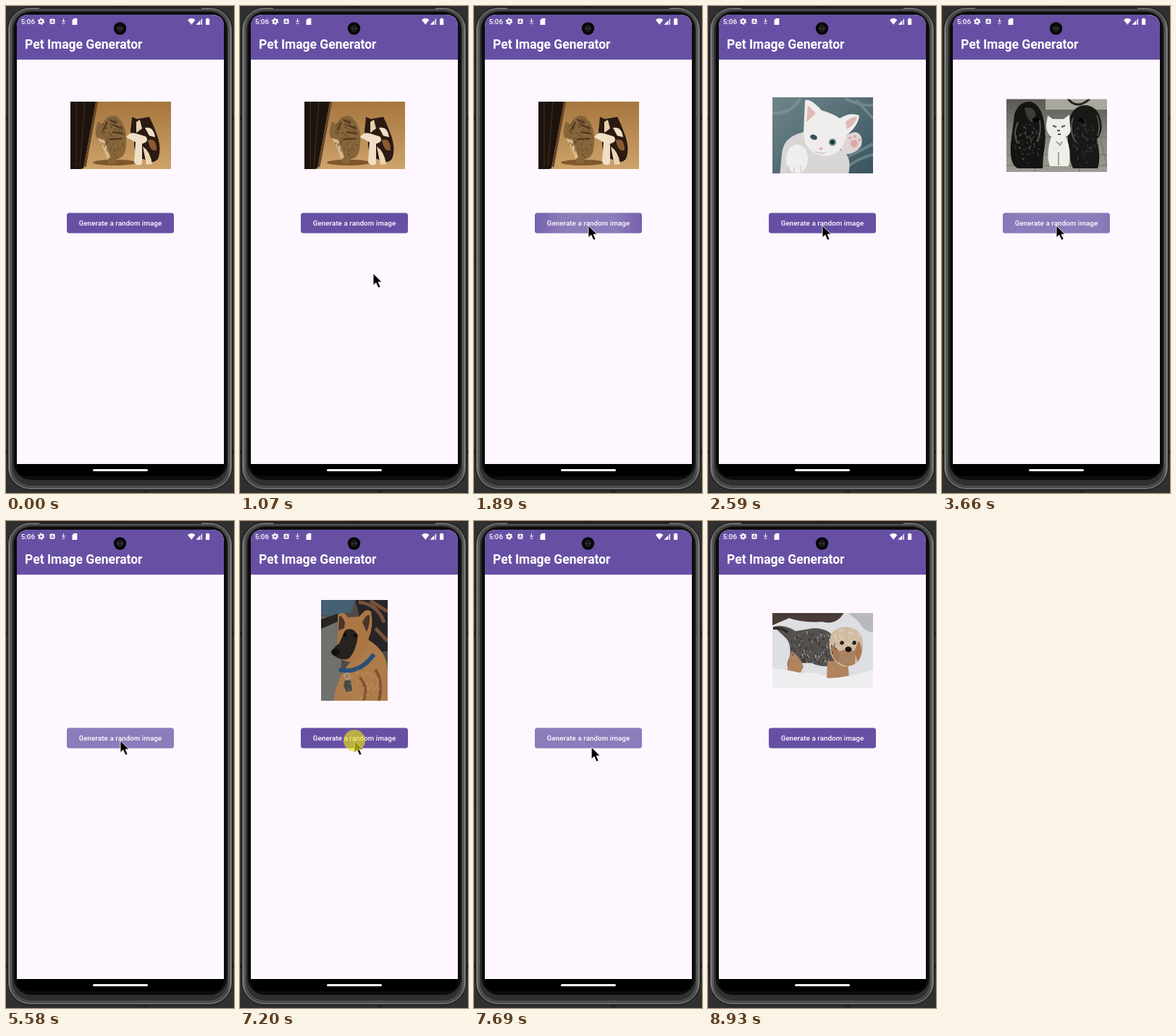
Animation of 315 by 672 pixels, one loop 9.99 s. Source, as an HTML page:

```html
<!DOCTYPE html>
<html lang="en">
<head>
<meta charset="utf-8">
<title>Pet Image Generator</title>
<style>
html, body { margin: 0; width: 100%; height: 100%; overflow: hidden; background: #303030; }
#stage { display: block; width: 315px; height: 672px; }
text { font-family: Roboto, sans-serif; fill: #fff; }
</style>
</head>
<body>
<svg id="stage" viewBox="0 0 315 672">
  <defs>
    <filter id="soft" x="-10%" y="-10%" width="120%" height="120%"><feGaussianBlur stdDeviation="0.6"/></filter>
    <clipPath id="screenClip"><path d="M15 632V29Q15 12 32 12H284Q301 12 301 29V632Z"/></clipPath>
    <clipPath id="buttonClip"><rect x="84" y="285.5" width="148" height="28" rx="3.5"/></clipPath>
    <radialGradient id="rippleFill">
      <stop offset=".4" stop-color="#fff" stop-opacity=".25"/>
      <stop offset="1" stop-color="#fff" stop-opacity="0"/>
    </radialGradient>
    <linearGradient id="rim" x2="1" y2="0">
      <stop stop-color="#777"/><stop offset=".02" stop-color="#444"/>
      <stop offset=".98" stop-color="#444"/><stop offset="1" stop-color="#777"/>
    </linearGradient>
    <linearGradient id="sand" x2="0" y2="1"><stop stop-color="#a3733c"/><stop offset="1" stop-color="#d0a66d"/></linearGradient>
    <linearGradient id="denim" x2="1" y2="1"><stop stop-color="#71878c"/><stop offset="1" stop-color="#38525d"/></linearGradient>
    <linearGradient id="paving" x2="0" y2="1"><stop stop-color="#55554f"/><stop offset=".5" stop-color="#85857c"/><stop offset="1" stop-color="#a09f95"/></linearGradient>
  </defs>

  <!-- phone -->
  <rect width="315" height="672" fill="#303030"/>
  <g fill="#222">
    <path d="M0 152h4v5h-4zM311 152h4v5h-4zM0 612h4v5h-4zM311 612h4v5h-4zM154 0h7v3h-7zM189 667h7v4h-7z"/>
  </g>
  <rect x="2.5" y="1.5" width="310" height="666.5" rx="31" fill="url(#rim)" stroke="#161616"/>
  <rect x="4.5" y="3.5" width="306" height="662" rx="29" fill="none" stroke="#858585"/>
  <rect x="7.5" y="5.5" width="300" height="657" rx="27" fill="#303030" stroke="#5c5c5c"/>
  <rect x="10.5" y="8" width="295" height="646" rx="24" fill="#0c0c0c"/>
  <path d="M46 3h224" stroke="#292929" stroke-width="2"/>
  <path d="M15 631H301V633Q301 649 285 649H31Q15 649 15 633Z"/>

  <!-- app -->
  <g clip-path="url(#screenClip)">
    <rect x="15" y="12" width="286" height="620" fill="#fef7ff"/>
    <rect x="15" y="12" width="286" height="62" fill="#6750a4"/>
  </g>
  <rect x="120" y="639" width="76" height="3" rx="1.5" fill="#fff"/>
  <circle cx="157.5" cy="31" r="8.7" fill="#050505"/>
  <circle cx="157.5" cy="31" r="5" fill="#1b1b1d"/>
  <path d="M154.5 31h1.4M159 31h1.6" stroke="#77777c" stroke-width="1.2"/>
  <text x="20.7" y="25" font-size="9.8" font-weight="500">5:06</text>
  <text x="26" y="59" font-size="17.5" font-weight="700">Pet Image Generator</text>

  <!-- status icons -->
  <g fill="#fff">
    <circle cx="48.5" cy="21.3" r="2.5" fill="none" stroke="#fff" stroke-width="2"/>
    <circle cx="48.5" cy="21.3" r="4" fill="none" stroke="#fff" stroke-width="1.4" stroke-dasharray="2.1 2.09"/>
    <rect x="60.5" y="17.7" width="7" height="7" rx="1"/>
    <path d="M62.2 23.4L64 19.2L65.8 23.4M62.9 22.2h2.2" fill="none" stroke="#6750a4" stroke-width=".9"/>
    <path d="M79.5 17.3v4.5M77.3 20l2.2 2.3l2.2-2.3M77.5 23.5q2 2.5 4 0" fill="none" stroke="#fff"/>
    <path d="M91.5 19.5L94 17H98.3V26H91.5Z"/>
    <path d="M251 19.2Q256.200 14.800 261.400 19.200L256.200 25.700Z"/>
    <path d="M271 17.200V25.700H262.700Z" fill-opacity=".45"/>
    <path d="M268 20.300V25.700H262.700ZM270 17.800h1v7.900h-1z"/>
    <path d="M277.500 16.700h2.200v1h1.500v8.300h-5.200v-8.300h1.500z"/>
  </g>

  <!-- pictures -->
  <svg class="photo" x="89" y="132" width="139" height="93" viewBox="89 132 139 93"><g filter="url(#soft)">
    <rect x="84" y="127" width="149" height="103" fill="url(#sand)"/>
    <path d="M84 127H125L107 224L84 230Z" fill="#1d130d"/>
    <path d="M126 130L109 222" stroke="#654527" stroke-width="3"/>
    <path d="M97 132V222M109 132L102 222" stroke="#3a281a" stroke-width="1.5"/>
    <ellipse cx="150" cy="216" rx="30" ry="4" fill="#80572d"/>
    <path d="M124 170L127 159L133 163Q140 148 153 152Q168 165 166 188Q166 210 153 211L150 218H141Q143 200 134 190Q122 184 124 170Z" fill="#87653b"/>
    <path d="M143 157l10 5M148 164l12 5M147 174l15 2M143 184l17-1M140 160l-6 12" stroke="#4b341f" stroke-width="2"/>
    <path d="M126 182l10 3l8 24l-4 2l-7-18z" fill="#d7b98d"/>
    <path d="M173 164L174 153L181 156L192 154L198 153Q204 165 207 174Q216 195 210 211Q203 219 192 212Q176 208 177 187Q170 178 173 164Z" fill="#2a1a12"/>
    <path d="M166 181Q171 173 180 176L193 180Q199 187 188 190L188 218Q180 222 177 215L179 188Z" fill="#f0dfc6"/>
    <path d="M189 194Q199 200 202 218L194 219Z" fill="#ecd5b5"/>
    <path d="M180 160l5-3l3 12l-8 6z" fill="#e7d0ad"/>
    <path d="M192 168Q204 166 206 181L198 179Z" fill="#f0dfc6"/>
    <path d="M196 185q12-4 12 14q-9 3-12-14z" fill="#8b5930"/>
    <g class="fur" data-area="146,182,18,28" data-ink="#55391f" data-count="70"/>
  </g></svg>

  <svg class="photo" x="89" y="126" width="139" height="105" viewBox="89 126 139 105"><g filter="url(#soft)">
    <rect x="84" y="121" width="149" height="115" fill="url(#denim)"/>
    <path d="M89 148Q112 150 128 128M190 128Q215 140 230 136M185 228Q205 210 228 205M180 215Q200 205 228 190M205 130L228 155" fill="none" stroke="#8ba1a4" stroke-width="4" opacity=".5"/>
    <path d="M102 204Q104 180 132 174L180 198Q202 204 193 236H99Z" fill="#d8d5d5"/>
    <path d="M182 190Q190 175 204 174Q215 177 212 192Q205 205 185 205Z" fill="#ddd6d5"/>
    <path d="M132 174L134 131Q139 125 157 144Q172 148 182 155Q196 146 209 151Q208 165 191 179Q188 202 166 207Q143 207 134 189Z" fill="#efecec"/>
    <path d="M138 137L149 148L136 160ZM190 160Q199 152 206 153Q202 165 192 170Z" fill="#dfb9b5"/>
    <ellipse cx="146" cy="181" rx="5" ry="3.500" fill="#3d5058" transform="rotate(20 146 181)"/>
    <circle cx="172" cy="188" r="5" fill="#5f8589"/><circle cx="172" cy="188" r="2.700" fill="#162a31"/>
    <path d="M153 196l6-1l-3 4z" fill="#d8999a"/>
    <path d="M148 201q8 4 14 1" fill="none" stroke="#b9a8a6"/>
    <ellipse cx="123" cy="211" rx="15" ry="20" fill="#efeded"/>
    <path d="M111 221v9M119 222v9M128 221v8" stroke="#c2bdbd"/>
    <g fill="#dfa6a2"><circle cx="202" cy="190" r="5"/><circle cx="196" cy="182" r="2"/><circle cx="203" cy="180" r="2"/><circle cx="209" cy="185" r="2"/></g>
  </g></svg>

  <svg class="photo" x="89" y="128.500" width="139" height="100.500" viewBox="89 128.500 139 100.500"><g filter="url(#soft)">
    <rect x="84" y="123" width="149" height="112" fill="url(#paving)"/>
    <path d="M84 180H233M84 205H233M84 220H233M140 180L128 229M180 180L190 229M218 180L230 229" stroke="#6e6e67"/>
    <path d="M143 123H233V143H143Z" fill="#a7a79d"/>
    <path d="M174 128Q187 144 204 128" fill="none" stroke="#242421" stroke-width="3"/>
    <path d="M100 150Q105 132 122 132Q137 136 141 160Q145 183 140 205L139 224H105Q93 220 95 190Z" fill="#141413"/>
    <path d="M175 160Q180 136 200 137Q217 140 220 160Q223 174 214 184Q220 210 215 224H181Q171 202 175 160Z" fill="#181817"/>
    <path d="M114 141q11-4 16 8l-5 12q-8-4-11-20z" fill="#3c3c39"/>
    <path d="M105 160q-8 18 0 30M135 158q3 18-4 29M181 154q-6 20 4 34M214 151q6 15 1 28" fill="none" stroke="#52524e" stroke-width="2"/>
    <ellipse cx="129" cy="157" rx="4" ry="3" fill="#040404"/><ellipse cx="192" cy="158" rx="4" ry="3" fill="#040404"/>
    <g class="fur" data-area="119,190,20,28" data-ink="#676761" data-count="65"/>
    <g class="fur" data-area="198,185,17,30" data-ink="#53534e" data-count="55"/>
    <path d="M144 164L146 151L153 156H168L176 150L177 165Q180 177 171 180Q180 200 175 221H149Q143 205 151 180Q144 176 144 164Z" fill="#eeeee8"/>
    <path d="M153 165l5 2M165 167l5-2M159 172h4M160 177h4" stroke="#555550" stroke-width="2"/>
    <path d="M158 187l5 5l3-5M161 202v18" stroke="#a2a299" stroke-width="2" fill="none"/>
  </g></svg>

  <svg class="photo" x="112" y="109" width="92" height="139" viewBox="112 109 92 139"><g filter="url(#soft)">
    <rect x="107" y="104" width="102" height="149" fill="#514a44"/>
    <path d="M107 104H160L154 126L126 132L107 129Z" fill="#455f73"/>
    <path d="M107 132H140V253H107Z" fill="#70706c"/>
    <path d="M107 137L135 128L139 137L107 151Z" fill="#292421"/>
    <path d="M158 104H209V180H177Z" fill="#282326"/>
    <path d="M164 112Q190 114 199 140M180 110L204 125M187 148L204 166" stroke="#74513b" stroke-width="5" fill="none"/>
    <path d="M177 164Q202 178 204 205V253H129Q132 222 145 204Z" fill="#ad7c4b"/>
    <path d="M135 156L135 130Q142 122 149 133L165 132Q174 119 181 125Q185 145 178 161Q176 186 156 194Q140 196 134 182Z" fill="#aa7744"/>
    <path d="M136 151L137 131Q141 130 145 140L144 148ZM169 140Q175 127 179 130Q180 143 175 153Z" fill="#493528"/>
    <path d="M145 151Q156 145 163 158Q160 181 150 190Q138 194 127 183Q128 174 137 169Z" fill="#27221f"/>
    <ellipse cx="132" cy="181" rx="6" ry="5" fill="#11100f"/>
    <circle cx="145" cy="157" r="2.400" fill="#0b0808"/><circle cx="159" cy="158" r="2.400" fill="#0b0808"/>
    <path d="M137 205Q165 212 185 184" fill="none" stroke="#294f78" stroke-width="6"/>
    <path d="M145 220l8 0l2 14l-8 2l-4-9z" fill="#44494b"/><circle cx="148" cy="214" r="4" fill="none" stroke="#a3a5a3" stroke-width="1.500"/>
    <path d="M164 214Q178 228 171 248M187 205Q198 221 192 248" fill="none" stroke="#805330" stroke-width="4"/>
    <g class="fur" data-area="171,225,25,23" data-ink="#c7965f" data-count="75"/>
  </g></svg>

  <svg class="photo" x="89" y="127" width="139" height="103" viewBox="89 127 139 103"><g filter="url(#soft)">
    <rect x="84" y="122" width="149" height="113" fill="#dedfe3"/>
    <path d="M84 122H190Q180 145 158 139Q132 141 112 134L84 146Z" fill="#493b37"/>
    <path d="M192 125H233V155Q216 154 209 140Z" fill="#b9b9bd"/>
    <path d="M91 146Q105 142 121 152L145 148Q172 147 178 170L176 199Q157 203 143 196L125 196L116 207Q105 203 113 187Q116 169 106 160Z" fill="#55514f"/>
    <path d="M116 180Q128 188 132 201L128 209H110Q109 194 116 180ZM165 194L193 191L195 218H164Z" fill="#b1835f"/>
    <path d="M84 203Q112 205 128 210Q153 207 166 217Q204 215 233 203V235H84Z" fill="#eeeef1"/>
    <path d="M90 148q14-1 20 6" fill="none" stroke="#2e2b2a" stroke-width="4"/>
    <path d="M168 161Q173 147 190 146Q211 147 214 166Q215 184 207 194Q193 207 178 196Q165 184 168 161Z" fill="#cfbba1"/>
    <path d="M170 170Q169 187 180 196L184 182ZM208 165Q217 180 207 194L202 180Z" fill="#a87854"/>
    <path d="M182 180Q194 174 204 181L203 197Q192 204 181 195Z" fill="#a98262"/>
    <circle cx="185" cy="168" r="2.800" fill="#211815"/><circle cx="202" cy="168" r="2.800" fill="#211815"/>
    <ellipse cx="194" cy="177" rx="4.500" ry="3.800" fill="#17110f"/>
    <g class="fur" data-area="145,174,32,23" data-ink="#252322" data-count="95"/>
    <g class="fur" data-area="145,174,35,24" data-ink="#b8b5b4" data-count="55"/>
    <g class="fur" data-area="191,158,20,12" data-ink="#eadcc8" data-count="45"/>
  </g></svg>

  <!-- button -->
  <g clip-path="url(#buttonClip)">
    <rect x="84" y="285" width="148" height="29" fill="#6750a4"/>
    <circle id="ripple" cx="158" cy="303" r="0" fill="url(#rippleFill)"/>
  </g>
  <text x="158" y="303.200" font-size="9.800" font-weight="500" letter-spacing=".06" text-anchor="middle">Generate a random image</text>
  <path id="cursor" d="M0 0V16.500L3.800 13L7 20L10 18.700L7 12H12Z" fill="#000" stroke="#fff" stroke-width=".8"/>
  <circle id="tap" cx="158" cy="303" r="15" fill="#e5df18" fill-opacity=".65"/>
</svg>

<script>
const LOOP = 9990;
const get = id => document.getElementById(id);
const show = (el, on) => el.setAttribute('visibility', on ? 'visible' : 'hidden');
const photos = [...document.querySelectorAll('.photo')];

// [time, picture index]; -1 leaves the space empty
const slides = [[0, 0], [2030, -1], [2170, 1], [3520, -1], [3590, 2],
  [5370, -1], [5860, 3], [7550, -1], [7760, 4]];
// [press, end of ripple]
const taps = [[1620, 2590], [3250, 4150], [5090, 6000], [7200, 7900]];
// [start, end, from x, from y, to x, to y]
const moves = [[450, 580, 252, 555, 209, 432], [800, 1350, 209, 432, 158, 303],
  [7620, 8110, 158, 303, 232, 461], [8380, 8930, 232, 461, 288, 676]];

let seed = 7;
const random = () => (seed = seed * 16807 % 2147483647) / 2147483647;

function growFur(group) {
  const { area, ink, count } = group.dataset;
  const [cx, cy, rx, ry] = area.split(',').map(Number);
  let d = '';
  for (let i = 0; i < count; i++) {
    const angle = random() * Math.PI * 2, r = Math.sqrt(random());
    d += `M${cx + rx * r * Math.cos(angle)} ${cy + ry * r * Math.sin(angle)}l${random() * 3 - 1.5} ${1 + random() * 3}`;
  }
  const path = document.createElementNS('http://www.w3.org/2000/svg', 'path');
  path.setAttribute('d', d);
  path.setAttribute('stroke', ink);
  path.setAttribute('stroke-width', 0.8);
  group.append(path);
}

function cursorAt(t) {
  const move = moves.filter(m => t >= m[0]).pop();
  if (!move || t >= 8930) return null;
  const [start, end, x0, y0, x1, y1] = move;
  const p = Math.min(1, (t - start) / (end - start));
  const k = p * p * (3 - 2 * p);
  return [x0 + (x1 - x0) * k, y0 + (y1 - y0) * k];
}

function draw(t) {
  const slide = slides.filter(s => t >= s[0]).pop()[1];
  photos.forEach((photo, i) => photo.style.display = i === slide ? '' : 'none');

  const tap = taps.find(([press, end]) => t >= press && t < end);
  const age = tap ? t - tap[0] : -1;
  show(get('tap'), age >= 0 && age < 200);
  get('ripple').setAttribute('r', age >= 70 ? Math.min(230, 15 + (age - 70) * 0.4) : 0);

  const at = cursorAt(t);
  show(get('cursor'), at);
  if (at) get('cursor').setAttribute('transform', `translate(${at})`);
}

document.querySelectorAll('.fur').forEach(growFur);
const begin = performance.now();
function tick() {
  draw((performance.now() - begin) % LOOP);
  requestAnimationFrame(tick);
}
tick();
</script>
</body>
</html>
```
